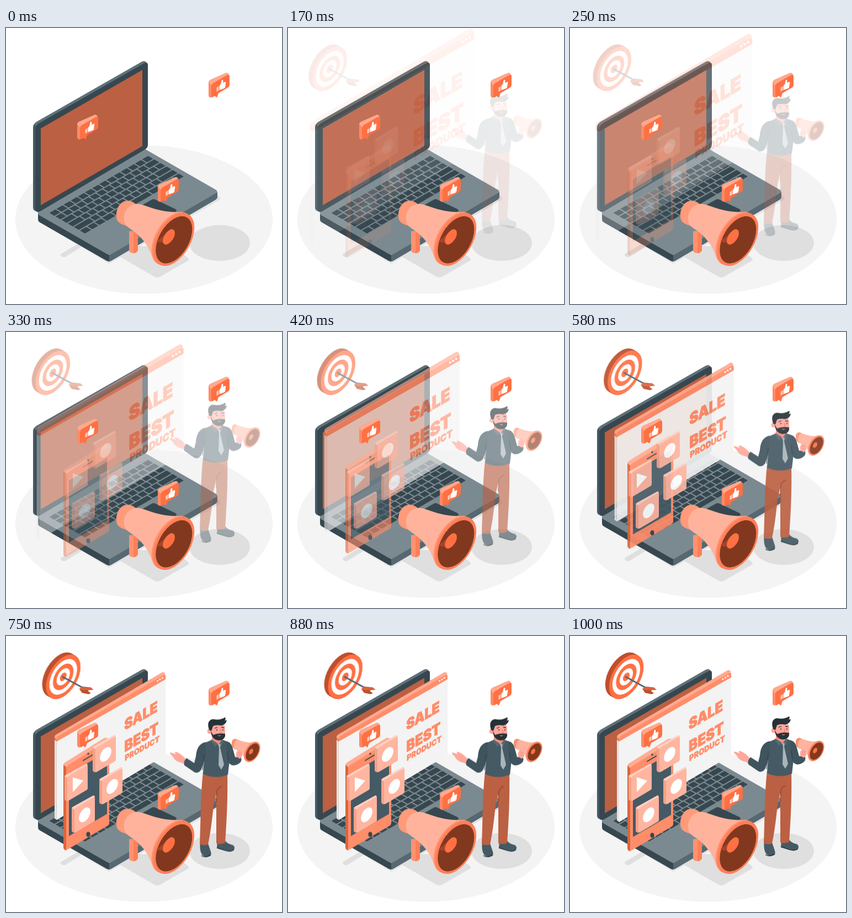
An HTML page for the animation above (1040 ms loop, 500 px wide and 500 px high).

```html
<!DOCTYPE html>
<html lang="en">
<head>
<meta charset="utf-8">
<title>Online promotion</title>
<style>
  html, body { margin: 0; width: 100%; height: 100%; overflow: hidden; background: #fff; }
  svg { display: block; width: 100vw; height: 100vh; }
  .move { animation: enter 1.04s infinite; }
  /* Each part starts displaced by --from and settles with a small overshoot */
  @keyframes enter {
    0% { opacity: 0; transform: var(--from); animation-timing-function: cubic-bezier(.34, -.01, .49, 1.38); }
    94.4%, 100% { opacity: 1; transform: none; }
  }
  .target { --from: translateX(-30px); }
  .page { --from: scale(1.5); transform-origin: 188.5px 199px; }
  .phone { --from: translateY(30px); }
  .tiles { --from: translateY(0); }
  .man { --from: translateY(-30px); }
  text { font-family: Inter, Lato, sans-serif; font-weight: 900; fill: #ff8c69; stroke: #ff8c69; stroke-width: .9; }
  .small { stroke-width: .4; }
  .round { stroke-linejoin: round; }
</style>
</head>
<body>
<svg viewBox="0 0 500 500" xmlns="http://www.w3.org/2000/svg">
  <defs>
    <g id="bubble">
      <path d="M0 18Q0 15 3 13L30 1Q34 -1 36 2L38 6L6 24L5 45Q0 45 0 41Z" fill="#ff8a66"/>
      <path d="M0 17Q0 15 3 13L30 1Q34 -1 36 2L37 4L7 21L5 23Z" fill="#ffa88e"/>
      <path d="M5 24Q5 21 8 19L34 4Q38 3 38 7V22Q38 25 35 27L18 37L15 45L11 42L8 44Q5 46 5 42Z" fill="#ff7043"/>
      <path d="M14.500 27L18.500 24.500V32L14.500 34.500Z" fill="#ffc9ba"/>
      <path d="M19.500 24L22.500 20L23.500 14Q25.500 11 26.500 15L26 18.500L30 16.500Q32 17 31 19.500L30 26.500Q29.500 28 28 28.500L19.500 31.500Z" fill="#fff"/>
    </g>
    <g id="tile">
      <path d="M0 24Q0 22 2 21L38 1Q41 -1 42 3L5 27Z" fill="#ffd0c3"/>
      <path d="M0 23L5 26V68Q0 67 0 64Z" fill="#f3a18a"/>
      <path d="M5 27Q5 24 7 23L39 4Q42 2 42 5V45Q42 47 40 48L8 67Q5 69 5 66Z" fill="#ffb5a0"/>
    </g>
    <circle id="badge" r="12" fill="#fff" transform="matrix(.866 -.5 0 1 23.500 35.500)"/>
  </defs>

  <!-- floor and shadows -->
  <ellipse cx="250" cy="347" rx="233" ry="134.500" fill="#f4f4f4"/>
  <g fill="#dfdfdf">
    <path d="M58 349L187 427L386 312Q390 309 387 306L380 300Z" fill="#e3e3e3"/>
    <path d="M100 409L130 391L138 396L107 415Q103 416 100 413Q98 411 100 409Z"/>
    <path d="M204 413L268 450Q274 454 280 450L329 422Q333 419 329 416L300 395H240Z"/>
    <ellipse cx="387" cy="389.500" rx="55" ry="32.500"/>
  </g>

  <!-- laptop -->
  <g class="round">
    <path d="M58 336L187 411V423Q184 423 181 421L61 352Q58 350 58 347Z" fill="#37474f"/>
    <path d="M187 411L383 297V306Q383 309 380 311L192 421Q189 423 187 423Z" fill="#566871"/>
    <path d="M58 332L246 216L260 224L380 293Q385 296 380 299L192 409Q187 412 182 409L60 339Q57 337 58 332Z" fill="#7b8a90"/>
    <path id="keys" transform="matrix(.866 -.5 .866 .5 76.500 335)" fill="#37474f" stroke="#37474f"/>
    <path d="M225 333L264 311Q267 309 271 311L307 328Q311 331 307 333L268 356Z" fill="#37474f"/>
    <path d="M49 181Q49 174 55 170L246 61Q250 59 253 61L257 65L250 216L60 333Q49 333 49 325Z" fill="#5f7078"/>
    <path d="M49 181Q49 177 51 174L54 178V331Q49 329 49 325Z" fill="#455a64"/>
    <path d="M53 184Q53 177 59 173L250 64Q257 61 257 68V211Q257 217 252 220L62 332Q53 336 53 326Z" fill="#37474f"/>
    <path d="M63 182L247 76V214L63 321Z" fill="#bb6043"/>
  </g>

  <g class="move target">
    <g id="edge" fill="#bf4f2d"></g>
    <g id="rings" transform="matrix(.866 -.5 0 1 102 74)"></g>
    <path d="M101 74L146 98.500" stroke="#566871" stroke-width="3" stroke-linecap="round"/>
    <path d="M131 95.500L137 91.500L152 93L157 97.500L145 98.500Z" fill="#d9613b"/>
    <path d="M131 95.500L145 98.500L152 103.500L148 105.500L136 103Z" fill="#bf4f2d"/>
  </g>

  <g class="move page">
    <path d="M85 185L89 189V337L85 334Z" fill="#e4e4e4"/>
    <path d="M89 188L292 74V216L89 337Z" fill="#f3f3f3"/>
    <path d="M85 184Q85 180 88 178L284 63Q288 60 291 64L290 72L89 190L85 187Z" fill="#ffa98f"/>
    <path d="M85 183L89 187V191L85 188Z" fill="#e87953"/>
    <path d="M89 186Q89 183 92 181L288 67.500Q292 65 292 69V75L89 191Z" fill="#ff8d6a"/>
    <g fill="#fff">
      <circle cx="277" cy="78" r="1.600"/><circle cx="281.500" cy="75.300" r="1.600"/><circle cx="286" cy="72.500" r="1.600"/>
    </g>
    <text transform="matrix(.866 -.5 0 1 215 170.500)" font-size="27.500">SALE</text>
    <text transform="matrix(.866 -.5 0 1 215 211)" font-size="28">BEST</text>
    <text class="small" transform="matrix(.866 -.5 0 1 216 227.500)" font-size="15">PRODUCT</text>
  </g>

  <g class="move phone">
    <path d="M104 236Q104 232 108 230L177 187Q182 184 186 189L187 193L112 388L109 390Q104 389 104 384Z" fill="#ffac93"/>
    <path d="M104 235L109 239V390Q104 389 104 384Z" fill="#d9663f"/>
    <path d="M109 242Q109 238 112 236L181 193Q187 190 187 196V340Q187 344 183 346L114 387Q109 390 109 384Z" fill="#ff8d6a"/>
    <path d="M114 252L183 211V324L114 364Z" fill="#455a64"/>
    <g fill="#37474f">
      <ellipse cx="149" cy="361" rx="3.600" ry="4.500"/>
      <circle cx="149" cy="215" r="1.700"/>
      <path d="M140 227L157 217" stroke="#37474f" stroke-width="2" stroke-linecap="round"/>
    </g>
  </g>

  <g class="move tiles">
    <g transform="translate(157 179)"><use href="#tile"/><use href="#badge"/></g>
    <g transform="translate(169 237)"><use href="#tile"/><use href="#badge"/></g>
    <g transform="translate(119 288.500)"><use href="#tile"/><use href="#badge"/></g>
    <g transform="translate(106 231)"><use href="#tile"/><path d="M15 25V52L34 31Z" fill="#fff"/></g>
  </g>

  <use href="#bubble" x="129" y="157"/>
  <use href="#bubble" x="367" y="81"/>
  <use href="#bubble" x="275" y="270"/>

  <!-- large megaphone -->
  <g>
    <path d="M223 368H239V403Q236 408 230 408Q223 407 223 403Z" fill="#ff9270"/>
    <path d="M231 368H239V403Q236 408 231 408Z" fill="#ff7f57"/>
    <path d="M200 342C199 328 206 315 218 313Q226 312 234 318L243 340L218 358Q200 354 200 342Z" fill="#ff9a7b"/>
    <path d="M214 347C213 333 221 321 234 319C242 318 249 321 258 324C278 331 298 335 320 333L270 424C263 412 260 399 251 388C242 375 231 368 220 360Q214 356 214 347Z" fill="#ffb39d"/>
    <g id="horn"></g>
    <path d="M273 386L286 376L288 389L276 388Z" fill="#a5452a"/>
    <g fill="#ff7043">
      <circle r="11.500" transform="matrix(.866 -.5 0 1 294 379.500)"/>
      <circle r="11.500" transform="matrix(.866 -.5 0 1 296 377.500)"/>
    </g>
  </g>

  <g class="move man">
    <g fill="#455a64">
      <path d="M352 372Q350 386 355 394Q360 400 369 397Q373 395 371 389L366 374Z"/>
      <path d="M383 370L397 369Q401 375 411 377Q416 381 413 385Q408 390 397 386L382 382Z"/>
    </g>
    <path d="M354 396Q361 401 371 395M382 382L398 387Q408 390 413 385" fill="none" stroke="#263238" stroke-width="1.500"/>
    <path d="M357 244L401 246C402 290 400 330 397 373Q389 377 381 374L381 285L376 305C373 335 370 358 366 376Q358 379 351 375C353 330 352 290 357 244Z" fill="#bb6043"/>
    <path d="M381 300L382 280Q384 273 391 271" fill="none" stroke="#96472f" stroke-width="1.500"/>

    <g transform="translate(0 -1.500)">
      <path d="M325 222Q317 213 309 210Q305 209 306 212L308 214L299 211Q295 211 298 214L302 218Q306 226 313 228Q319 229 323 232Z" fill="#ffa79b"/>
      <g fill="#455a64">
        <path d="M361 193L375 187L393 188Q404 191 408 200L402 251Q380 260 357 250L359 222Z"/>
        <path d="M362 192C350 194 345 204 344 218L341 230L327 221Q321 227 323 234L342 247Q350 249 354 241L362 217Z" fill="#40545e"/>
        <path d="M399 190Q409 193 411 204L415 219L426 220Q428 227 422 231Q411 238 404 230L400 214Z" fill="#40545e"/>
      </g>
      <path d="M359 214L356 243M401 209L403 226" stroke="#2f3f47"/>
      <path d="M373 180L391 184L390 193L384 197L373 189Z" fill="#f58d80"/>
      <path d="M372 187L384 195L379 201L371 190ZM391 188L386 195L390 200L394 191Z" fill="#566871"/>
      <path d="M384 195L389 196L388 202L395 233L390 242L385 234L386 202Z" fill="#a9b5ba"/>

      <!-- head -->
      <circle cx="369" cy="172.500" r="4.500" fill="#ffa79b"/>
      <path d="M371 166Q372 157 384 157Q397 157 397 167V180Q395 189 384 188Q372 185 371 175Z" fill="#ffa79b"/>
      <path d="M371 172L375 179Q385 175 397 177V181Q395 189 385 189Q372 187 371 172Z" fill="#263238"/>
      <path d="M383 180L390 179.500Q387 183 383 180Z" fill="#e57368"/>
      <path d="M368 170Q365 161 367 156Q371 149 379 151Q390 152 397 147Q399 150 396 153L400 152Q399 160 390 162Q380 160 375 163L372 172Z" fill="#263238"/>
      <path d="M378 167L383 165M390 165L395 166" stroke="#263238" stroke-width="1.300"/>
      <path d="M388 169L390 174L387 175" fill="none" stroke="#e57368"/>
      <g fill="#263238"><circle cx="382" cy="170" r="1.100"/><circle cx="393" cy="170" r="1.100"/></g>

      <!-- small megaphone -->
      <path d="M409 195Q408 188 414 186Q419 186 422 190L416 206Q409 202 409 195Z" fill="#ff8d6a"/>
      <path d="M413 199Q413 188 421 188C432 192 441 194 453 192L435 226C430 215 426 210 417 206Q413 204 413 199Z" fill="#ffb39d"/>
      <g id="smallHorn"></g>
      <circle r="4.500" transform="matrix(.866 -.5 0 1 444 209)" fill="#ff7043"/>
      <path d="M417 218Q416 210 420 207Q424 205 426 209L428 216Q427 221 423 222Z" fill="#ffa79b"/>
      <path d="M420 212L427 211M421 216L428 215" stroke="#f58d80"/>
    </g>
  </g>
</svg>
<script>
  const byId = id => document.getElementById(id);

  // Circle lying on the left-facing isometric wall
  const disc = (x, y, r, fill) =>
    `<circle r="${r}" transform="matrix(.866 -.5 0 1 ${x} ${y})" ${fill ? `fill="${fill}"` : ''}/>`;

  byId('edge').innerHTML = [0, 1, 2, 3, 4, 5, 6, 7]
    .map(i => disc(95 + i, 70 + i * 4 / 7, 36)).join('');
  byId('rings').innerHTML = [36, 29, 21.5, 14, 7]
    .map((r, i) => `<circle r="${r}" fill="${i % 2 ? '#fff' : '#ff7043'}"/>`).join('');

  byId('horn').innerHTML = disc(300.5, 381.5, 43, '#ff9a7b') + disc(302, 382, 43, '#ff8d6a')
    + disc(304, 383, 43, '#ff7f57') + disc(304.3, 383.7, 38.2, '#82381f');
  byId('smallHorn').innerHTML = disc(445, 209.5, 16.3, '#ff8d6a')
    + disc(446.5, 210, 16.3, '#ff7f57') + disc(446.5, 210, 14, '#82381f');

  // Key widths per row, in units, spread over the full keyboard width
  const same = n => Array(n).fill(1);
  const rows = [
    same(14),
    [...same(13), 1.6],
    [1.6, ...same(13)],
    [1.9, ...same(11), 2],
    [2.4, ...same(10), 2.4],
    [1, 1, 1, 1.3, 5, 1.3, 1, 1, 1],
  ];
  const boardWidth = 209, rowStep = 12.8, gap = 3.4;
  let keys = '';
  rows.forEach((row, i) => {
    const unit = boardWidth / row.reduce((a, b) => a + b);
    let x = 0;
    for (const size of row) {
      const w = size * unit - gap;
      keys += `M${x + gap / 2} ${i * rowStep + gap / 2}h${w}v${rowStep - gap}h${-w}z`;
      x += size * unit;
    }
  });
  byId('keys').setAttribute('d', keys);
</script>
</body>
</html>
```
